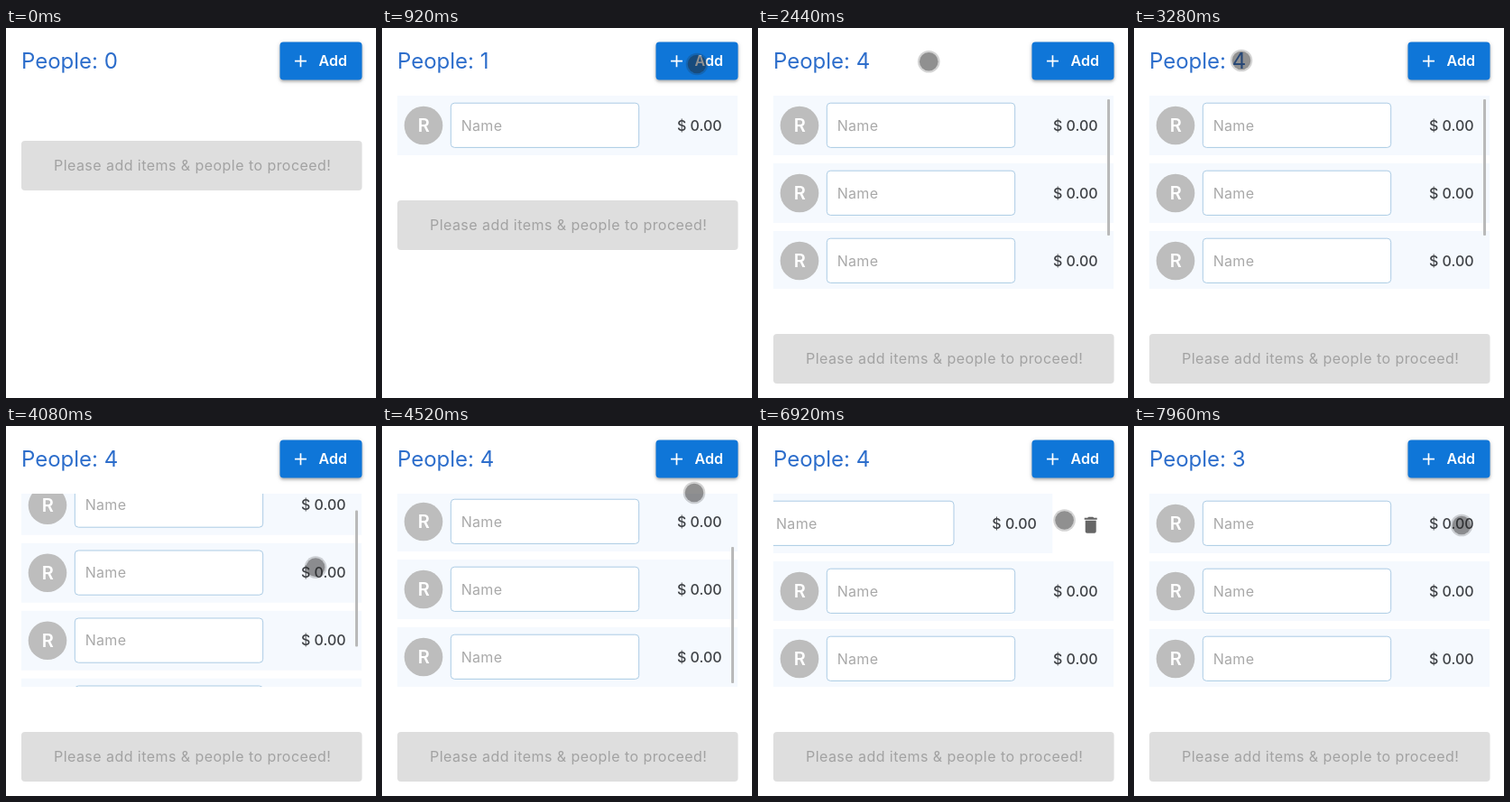
These frames come from a looping animation (410 px wide and 410 px high, 8000 ms). An HTML page:

```html
<!DOCTYPE html>
<html lang="en">
<head>
<meta charset="utf-8">
<title>People list</title>
<style>
html, body { margin: 0; width: 100%; height: 100%; overflow: hidden; background: #fff; }
svg { display: block; width: 100%; height: 100%; font: 16px Inter, Roboto, sans-serif; letter-spacing: .3px; }
.title { font-size: 24px; fill: #2c6dcb; letter-spacing: 0; }
.add { filter: drop-shadow(0 2px 1.5px rgba(0, 0, 0, .24)) drop-shadow(0 1px 2.5px rgba(0, 0, 0, .14)); }
.label { font-weight: 600; fill: #fff; letter-spacing: .1px; }
.initial { font-size: 20px; font-weight: 600; fill: #fff; text-anchor: middle; letter-spacing: 0; }
.price { font-weight: 500; fill: #3f4246; letter-spacing: 0; }
.hint { fill: #a2a2a2; letter-spacing: .45px; }
</style>
</head>
<body>
<svg viewBox="0 0 410 410">
  <defs>
    <clipPath id="view"><rect x="17" y="75" width="378" height="214"/></clipPath>
    <clipPath id="btn"><rect x="303.5" y="15.5" width="91" height="42" rx="4"/></clipPath>
    <g id="row">
      <rect x="17" y="75" width="377" height="66" fill="#f5f9fe"/>
      <circle cx="46" cy="108" r="21.3" fill="#bdbdbd"/>
      <text class="initial" x="46.3" y="115.3">R</text>
      <rect x="76.3" y="83.2" width="208.4" height="49.2" rx="4" fill="#fff" stroke="#abcbe4"/>
      <text x="87.7" y="113.5" fill="#a9a9a9">Name</text>
      <text class="price" x="327" y="113.5">$ 0.00</text>
    </g>
  </defs>

  <text class="title" id="title" x="17" y="45"></text>

  <rect class="add" x="303.5" y="15.5" width="91" height="42" rx="4" fill="#0f76d8"/>
  <g clip-path="url(#btn)"><circle id="ripple" cx="349" cy="40" fill="#fff"/></g>
  <path d="M320 36.7h13M326.5 30.2v13" stroke="#fff" stroke-width="1.7"/>
  <text class="label" x="346.4" y="42.3">Add</text>

  <g clip-path="url(#view)">
    <path id="trash" fill="#666" d="M6 19c0 1.1.9 2 2 2h8c1.1 0 2-.9 2-2V7H6v12zM19 4h-3.5l-1-1h-5l-1 1H5v2h14V4z"/>
    <g id="rows"></g>
  </g>
  <rect id="thumb" x="387" width="3" rx="1" fill="#b9b9b9"/>

  <g id="proceed">
    <rect x="17" y="125" width="377.5" height="55" rx="4" fill="#dedede"/>
    <text class="hint" x="53" y="158">Please add items &amp; people to proceed!</text>
  </g>

  <g id="cursor">
    <circle r="12.3" fill="#222" opacity=".2"/>
    <circle r="10.3" fill="#222" opacity=".38"/>
  </g>
</svg>
<script>
const LOOP = 8000, PITCH = 75, MAX_SCROLL = 77, SWIPE = 67.7;
const ADDED = [640, 1100, 1440, 1800], REMOVED = 7520;
const CLICKS = [560, 1020, 1360, 1720, 7440];
const PATH = [
  [80, 424, 76], [480, 349, 40], [1960, 349, 40], [2720, 119, 36],
  [3360, 119, 36], [3840, 342, 186], [3940, 342, 186], [4360, 346, 74],
  [4760, 346, 74], [5360, 356, 130], [5880, 356, 130], [6200, 392, 105],
  [6280, 392, 105], [6720, 329, 102], [6780, 329, 102], [7160, 363, 110]
];

const $ = id => document.getElementById(id);
const set = (el, name, value) => el.setAttribute(name, value);
const move = (el, x, y, s = 1) => set(el, 'transform', `translate(${x} ${y}) scale(${s})`);
const clamp = v => Math.min(1, Math.max(0, v));
const ease = p => p * p * (3 - 2 * p);
const ramp = (t, a, b) => ease(clamp((t - a) / (b - a)));

const rows = ADDED.map(() => {
  const use = document.createElementNS('http://www.w3.org/2000/svg', 'use');
  set(use, 'href', '#row');
  return $('rows').appendChild(use);
});

function cursorAt(t) {
  const next = PATH.findIndex(p => p[0] > t);
  if (next === 0) return PATH[0].slice(1);
  if (next < 0) return PATH[PATH.length - 1].slice(1);
  const [a, x, y] = PATH[next - 1], [b, x2, y2] = PATH[next];
  const k = ramp(t, a, b);
  return [x + (x2 - x) * k, y + (y2 - y) * k];
}

function draw(t) {
  const count = ADDED.filter(at => t >= at).length - (t >= REMOVED ? 1 : 0);
  $('title').textContent = 'People: ' + count;

  const scroll = MAX_SCROLL * (ramp(t, 3940, 4360) - ramp(t, 4800, 5360));
  const swipe = t < REMOVED ? SWIPE * ramp(t, 6280, 6720) : 0;
  rows.forEach((row, i) => {
    set(row, 'visibility', i < count ? 'visible' : 'hidden');
    move(row, i ? 0 : -swipe, i * PITCH - scroll);
  });
  set($('trash'), 'visibility', swipe > 0 ? 'visible' : 'hidden');
  move($('trash'), 356.7 + SWIPE - swipe, 97.7);

  set($('thumb'), 'y', 79 + 55 * scroll / MAX_SCROLL);
  set($('thumb'), 'height', count > 3 ? 151 : 204);
  set($('thumb'), 'opacity', count > 2 ? 1 - ramp(t, 5440, 5680) : 0);

  // The list grows with its rows until it reaches its maximum height.
  move($('proceed'), 0, count ? Math.min(count * PITCH - 9, 214) : 0);

  let press = 0, wave = 0, glow = 0;
  for (const at of CLICKS) {
    const d = t - at;
    press = Math.max(press, 1 - Math.abs(d) / 100);
    if (d > 0 && d < 340 && at < 2000) {
      wave = 60 * ramp(d, 0, 300);
      glow = .14 * (1 - d / 340);
    }
  }
  set($('ripple'), 'r', wave);
  set($('ripple'), 'opacity', glow);
  move($('cursor'), ...cursorAt(t), 1 - .14 * press);
}

const start = performance.now();
function tick() {
  draw((performance.now() - start) % LOOP);
  requestAnimationFrame(tick);
}
draw(0);
requestAnimationFrame(tick);
</script>
</body>
</html>
```
